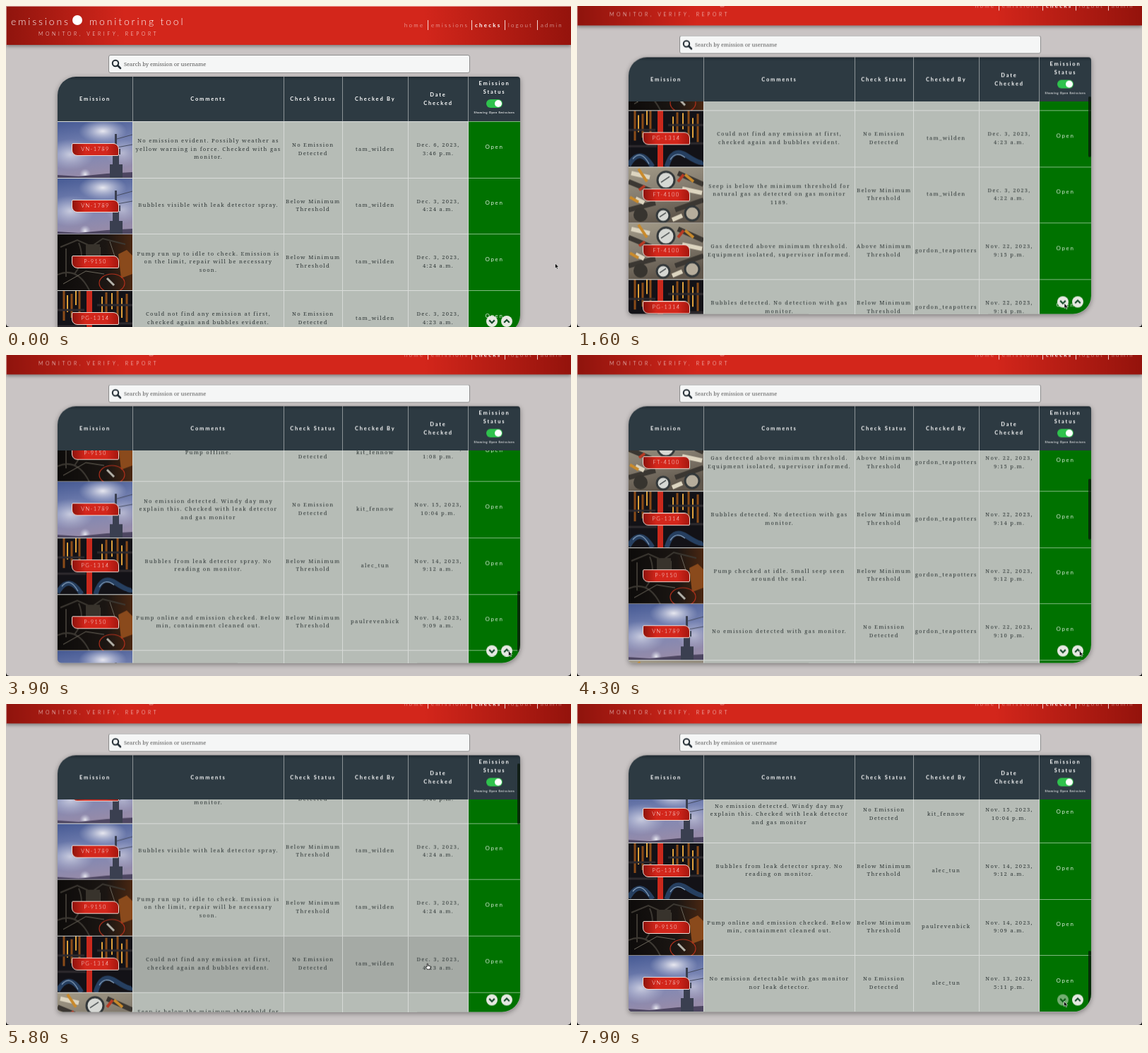
Recreate the animation shown at these times as an HTML page. Size 800x454 px, loop 8000 ms.

```html
<!DOCTYPE html>
<html lang="en">
<head>
<meta charset="utf-8">
<title>Emission checks</title>
<style>
  html, body { margin: 0; width: 100%; height: 100%; overflow: hidden; background: #111; }
  #stage { position: relative; width: 800px; height: 454px; overflow: hidden; background: #c9c4c4; border-radius: 0 0 5px 5px; }
  #page, #rows { position: absolute; left: 0; top: 0; width: 100%; will-change: transform; }
  #page *, #cursor { box-sizing: border-box; }

  header { position: absolute; width: 800px; height: 54.5px; color: #fff; font-family: Lato, sans-serif; font-weight: 300;
    background: linear-gradient(88deg, #8f140d, #d3261b 21%, #d3261b 74%, #94130c);
    box-shadow: 0 2px 5px rgba(0,0,0,.4), inset 1px 1px 0 rgba(255,255,255,.5); }
  header span { position: absolute; white-space: nowrap; line-height: 14px; }
  .title { top: 15px; font-size: 14px; letter-spacing: 2.85px; }
  .motto { left: 46px; top: 31.5px; font-size: 7px; letter-spacing: 3.6px; }
  .dot { position: absolute; left: 94px; top: 13px; width: 14px; height: 14px; border-radius: 50%; background: #fff; }
  .link { top: 20px; font-size: 8px; letter-spacing: 2.2px; opacity: .85; }
  .link.on { font-weight: 700; opacity: 1; }
  .bar { position: absolute; top: 20px; width: 1px; height: 14px; background: #f3d5d2; }

  .search { position: absolute; left: 145px; top: 69px; width: 512px; height: 26px; border: 1px solid #8b8b8b; border-radius: 3px;
    background: #f5f6f6; font: 300 7.5px/24px "Noto Serif", serif; color: #555; padding-left: 21px; }
  .search svg { position: absolute; left: 3px; top: 5px; }

  #table { position: absolute; left: 73px; top: 100px; width: 655px; height: 362.5px; overflow: hidden;
    border-radius: 26px 4px 26px 5px; }
  .shade { position: absolute; left: 73px; top: 100px; width: 655px; height: 362.5px;
    border-radius: 26px 4px 26px 5px; box-shadow: 0 2px 7px rgba(0,0,0,.4); }
  .row { display: grid; grid-template-columns: 107px 214px 82.5px 93.5px 85px 73px; }
  .row > div { position: relative; display: flex; align-items: center; justify-content: center; text-align: center;
    white-space: nowrap; border-right: 1px solid rgba(255,255,255,.45); }
  .row > div:last-child { border-right: 0; }
  .head { position: absolute; top: 0; z-index: 2; height: 63px; color: #fff; background: linear-gradient(#1f2a31, #2d3a42 5px);
    font: 700 7.5px/11.6px Lato, sans-serif; letter-spacing: 1.8px; }
  .head .last { flex-direction: column; justify-content: flex-start; padding-top: 4px; }
  .toggle { position: relative; width: 23px; height: 12px; margin-top: 5px; border-radius: 6px; background: #2fc24d; }
  .toggle::after { content: ""; position: absolute; right: 1px; top: 1px; width: 10px; height: 10px; border-radius: 50%; background: #fff; }
  .hint { font-size: 4px; line-height: 6px; letter-spacing: .6px; margin-top: 3.5px; }

  #body { position: absolute; top: 63px; width: 655px; height: 299.5px; overflow: hidden; background: #b6bcb6; }
  .check { height: 79.67px; color: #2d3535; background: #b6bcb6; font: 300 7.6px/11.5px "Noto Serif", serif; letter-spacing: 1.3px; }
  .check.hover { background: #a5aaa5; }
  .check > div { border-top: 1px solid rgba(255,255,255,.5); padding-bottom: 1.5px; }
  .check > .open { background: #007200; color: #d5ead5; padding-bottom: 9px; font: 400 8px/12px Lato, sans-serif; letter-spacing: 1.6px; }
  .pic { position: absolute; left: 0; top: 0; width: 106px; height: 79px; }
  .tag { position: absolute; left: 20px; top: 30px; width: 67px; height: 18px; border: 1px solid #f0d9d2; border-radius: 2px 8px 2px 8px;
    background: linear-gradient(90deg, #8f140d, #d3261b 28%, #d3261b 74%, #a5170f); color: #fff;
    font: 300 7.5px/16px Lato, sans-serif; letter-spacing: 1.4px; }
  .btn { position: absolute; z-index: 3; top: 337.5px; width: 16px; height: 16px; border-radius: 50%; background: #e6e9e2; }
  .btn svg { display: block; }
  #thumb { position: absolute; z-index: 4; left: 650.5px; top: 0; width: 4px; height: 86px; border-radius: 2px; background: rgba(8,22,10,.75); }
  #cursor { position: absolute; left: 0; top: 0; width: 12px; height: 14px; overflow: visible; }
</style>
</head>
<body>
<div id="stage">
  <div id="page">
    <div class="shade"></div>
    <header>
      <span class="title" style="left:7px">emissions</span><i class="dot"></i>
      <span class="title" style="left:118px">monitoring tool</span>
      <span class="motto">MONITOR, VERIFY, REPORT</span>
    </header>
    <div class="search">
      <svg width="15" height="15" fill="none" stroke="#222c33"><circle cx="6" cy="6" r="4.2" stroke-width="2"/><path d="M9 9L13 13" stroke-width="2.6" stroke-linecap="round"/></svg>Search by emission or username
    </div>
    <div id="table">
      <div class="row head">
        <div>Emission</div><div>Comments</div><div>Check Status</div><div>Checked By</div><div>Date<br>Checked</div>
        <div class="last">Emission<br>Status<i class="toggle"></i><span class="hint">Showing Open Emissions</span></div>
      </div>
      <div id="body"><div id="rows"></div></div>
      <div class="btn" id="down" style="left:607px"><svg width="16" height="16" fill="none" stroke="#14492a" stroke-width="2.2"><path d="M4.2 6.4L8 10.2L11.8 6.4"/></svg></div>
      <div class="btn" id="up" style="left:628px"><svg width="16" height="16" fill="none" stroke="#14492a" stroke-width="2.2"><path d="M4.2 9.8L8 6L11.8 9.8"/></svg></div>
      <div id="thumb"></div>
    </div>
  </div>
  <svg id="cursor">
    <path id="arrow" d="M0 0V7.2L1.7 5.7L2.9 8.3L4.1 7.8L3 5.3H5.2Z" fill="#000" stroke="#fff" stroke-width=".6"/>
    <path id="hand" d="M-1.4 -3.6Q-.8 -4.4 -.1 -3.6V-.9L2.9 -.3Q3.7 0 3.6 .9L3 4.2H-1.2L-3.4 1Q-3.2 -.2 -1.4 1Z" fill="#fff" stroke="#111" stroke-width=".8"/>
  </svg>
</div>

<svg width="0" height="0" style="position:absolute">
  <defs>
    <linearGradient id="sky" x2=".2" y2="1"><stop stop-color="#465a94"/><stop offset=".55" stop-color="#7d88b6"/><stop offset="1" stop-color="#968ba9"/></linearGradient>
    <radialGradient id="puff"><stop stop-color="#e8e8f0"/><stop offset="1" stop-color="#c4c8de" stop-opacity="0"/></radialGradient>
    <linearGradient id="rust"><stop stop-color="#0d0b0a"/><stop offset=".65" stop-color="#1b1613"/><stop offset="1" stop-color="#4a2712"/></linearGradient>
    <linearGradient id="brass" x2=".3" y2="1"><stop stop-color="#a39b88"/><stop offset=".5" stop-color="#857d70"/><stop offset="1" stop-color="#5f564b"/></linearGradient>
  </defs>
  <symbol id="VN" viewBox="0 0 106 79">
    <rect width="106" height="79" fill="url(#sky)"/>
    <g fill="url(#puff)"><ellipse cx="64" cy="13" rx="34" ry="17"/><ellipse cx="18" cy="46" rx="34" ry="22" opacity=".7"/><ellipse cx="92" cy="44" rx="24" ry="20" opacity=".5"/><circle cx="39" cy="74" r="8"/></g>
    <path d="M0 79V75L30 77L70 73L106 71V79Z" fill="#4d4661"/>
    <path d="M81 17H84V38H89V46H87V60H92V79H74V60H78V46H76V40H81Z" fill="#3a3f50"/>
    <path d="M84 24L106 18M84 36L106 32" stroke="#454b60"/>
  </symbol>
  <symbol id="P" viewBox="0 0 106 79">
    <rect width="106" height="79" fill="url(#rust)"/>
    <g fill="none" stroke="#3c3832" stroke-width="2">
      <path d="M4 18L28 8L48 17L64 6L96 14M0 57Q28 45 45 79M12 20V60M30 12Q40 36 24 56"/>
      <path d="M8 70L40 52L66 56M60 18V40M74 10L82 34" stroke="#6b665b" stroke-width="1"/>
    </g>
    <rect x="40" y="14" width="20" height="16" fill="#38332c"/>
    <path d="M86 28L98 22L106 30V56L90 62Z" fill="#8a4a1c"/>
    <path d="M70 62L80 72" stroke="#b5b3aa" stroke-width="3"/>
    <ellipse cx="77" cy="69" rx="18" ry="13" fill="none" stroke="#b5301c" stroke-width="1.2"/>
  </symbol>
  <symbol id="PG" viewBox="0 0 106 79">
    <rect width="106" height="79" fill="#131217"/>
    <path d="M9 0V42M20 4V38M31 0V46M69 2V40M85 0V48M98 4V44" stroke="#8a4b18" stroke-width="3"/>
    <path d="M14 6V30M26 0V20M63 8V36M77 3V26M91 10V38" stroke="#e0a23c" stroke-width="2"/>
    <path d="M0 27H38M56 20H106M0 50H40M54 46H106" stroke="#2e2a2e" stroke-width="3"/>
    <path d="M45 0V79" stroke="#c9281c" stroke-width="8"/>
    <path d="M0 77Q16 49 34 79M54 79Q62 50 82 63T106 73" fill="none" stroke="#263f60" stroke-width="7"/>
    <path d="M6 68Q18 54 29 75M59 69Q67 56 80 66" fill="none" stroke="#8ba4bf" stroke-width="1.2"/>
  </symbol>
  <symbol id="FT" viewBox="0 0 106 79">
    <rect width="106" height="79" fill="url(#brass)"/>
    <path d="M0 20L34 34M0 60L38 50M70 8L106 24M66 60L106 46" stroke="#3b3732" stroke-width="7"/>
    <path d="M4 8L30 14M76 30L104 36M10 44L22 50M62 74L76 68" stroke="#ddd5c0" stroke-width="6"/>
    <path d="M14 2L26 20M80 10L92 20M2 42L14 49" stroke="#c98a2c" stroke-width="4"/>
    <path d="M70 20L78 10M15 32L23 26" stroke="#b73a24" stroke-width="4"/>
    <g fill="#d6d8d4" stroke="#33383a" stroke-width="3"><circle cx="53" cy="18" r="12"/><circle cx="49" cy="68" r="9"/><circle cx="90" cy="65" r="10" fill="#b6ad9c"/></g>
    <path d="M46 21L58 13M44 70L53 64" stroke="#33393b" stroke-width="1.5"/>
    <circle cx="17" cy="67" r="10" fill="#37342f"/>
  </symbol>
</svg>

<script>
const $ = id => document.getElementById(id);
const LOOP = 8000, STEP = 100, ROW = 79.67, VIEW = 299.5, PAGE_SHIFT = 27.5;

const users = { a: "tam_wilden", b: "gordon_teapotters", c: "kit_fennow", d: "alec_tun", e: "paulrevenbick" };
const states = { N: "No Emission|Detected", B: "Below Minimum|Threshold", A: "Above Minimum|Threshold" };
const tags = { VN: "VN-1789", P: "P-9150", PG: "PG-1314", FT: "FT-4100" };

// picture, comment, state, user, date, time
const checks = [
  ["VN", "No emission evident. Possibly weather as|yellow warning in force. Checked with gas|monitor.", "N", "a", "Dec. 6", "3:46 p.m."],
  ["VN", "Bubbles visible with leak detector spray.", "B", "a", "Dec. 3", "4:24 a.m."],
  ["P", "Pump run up to idle to check. Emission is|on the limit, repair will be necessary|soon.", "B", "a", "Dec. 3", "4:24 a.m."],
  ["PG", "Could not find any emission at first,|checked again and bubbles evident.", "N", "a", "Dec. 3", "4:23 a.m."],
  ["FT", "Seep is below the minimum threshold for|natural gas as detected on gas monitor|1189.", "B", "a", "Dec. 3", "4:22 a.m."],
  ["FT", "Gas detected above minimum threshold.|Equipment isolated, supervisor informed.", "A", "b", "Nov. 22", "9:15 p.m."],
  ["PG", "Bubbles detected. No detection with gas|monitor.", "B", "b", "Nov. 22", "9:14 p.m."],
  ["P", "Pump checked at idle. Small seep seen|around the seal.", "B", "b", "Nov. 22", "9:12 p.m."],
  ["VN", "No emission detected with gas monitor.", "N", "b", "Nov. 22", "9:10 p.m."],
  ["FT", "Bubbles visible with leak detector spray.", "B", "c", "Nov. 19", "2:31 p.m."],
  ["PG", "No change since the last check.", "B", "c", "Nov. 19", "2:28 p.m."],
  ["VN", "Windy day, no emission evident on gas|monitor.", "N", "c", "Nov. 18", "1:15 p.m."],
  ["FT", "Seep still below the minimum threshold.", "B", "c", "Nov. 16", "1:10 p.m."],
  ["P", "Pump offline.", "N", "c", "Nov. 16", "1:08 p.m."],
  ["VN", "No emission detected. Windy day may|explain this. Checked with leak detector|and gas monitor", "N", "c", "Nov. 15", "10:04 p.m."],
  ["PG", "Bubbles from leak detector spray. No|reading on monitor.", "B", "d", "Nov. 14", "9:12 a.m."],
  ["P", "Pump online and emission checked. Below|min, containment cleaned out.", "B", "e", "Nov. 14", "9:09 a.m."],
  ["VN", "No emission detectable with gas monitor|nor leak detector.", "N", "d", "Nov. 13", "5:11 p.m."]
];
const MAX = checks.length * ROW - VIEW;

const lines = s => `<div>${s.replaceAll("|", "<br>")}</div>`;
$("rows").innerHTML = checks.map(([pic, note, state, user, day, time]) => `<div class="row check">
  <div><svg class="pic"><use href="#${pic}"/></svg><span class="tag">${tags[pic]}</span></div>
  ${lines(note)}${lines(states[state])}${lines(users[user])}${lines(`${day}, 2023,|${time}`)}
  <div class="open">Open</div></div>`).join("");
const rowEls = [...$("rows").children];

const header = document.querySelector("header");
[["home", 564], ["emissions", 602], ["checks", 664], ["logout", 711], ["admin", 757]].forEach(([name, x], i) => {
  const on = name === "checks" ? " on" : "";
  const bar = i ? `<i class="bar" style="left:${x - 5.5}px"></i>` : "";
  header.insertAdjacentHTML("beforeend", `${bar}<span class="link${on}" style="left:${x}px">${name}</span>`);
});

// Moves: start, end, from, to
const pageMoves = [[50, 650, 0, PAGE_SHIFT]];
const scrollMoves = [[1342, 2240, 0, MAX], [3772, 4672, MAX, 0], [5443, 6293, 0, 123], [7010, 7860, 123, MAX]];
const xMoves = [[650, 1250, 777.5, 690], [2800, 3450, 690, 711.5], [4550, 5000, 711.5, 597.5], [6350, 6750, 597.5, 689.5]];
const yMoves = [[650, 1250, 364, 420.5], [2800, 3450, 420.5, 418.5], [4550, 5000, 418.5, 371], [6350, 6750, 371, 420.5]];

const clamp = v => Math.min(1, Math.max(0, v));
const lastMove = (moves, t) => moves.findLast(m => t >= m[0]);
function valueAt(moves, t) {
  const m = lastMove(moves, t);
  if (!m) return moves[0][2];
  const p = clamp((t - m[0]) / (m[1] - m[0]));
  return m[2] + (m[3] - m[2]) * p * p * (3 - 2 * p);
}

function draw(t) {
  const shift = valueAt(pageMoves, t), scroll = valueAt(scrollMoves, t);
  const x = valueAt(xMoves, t), y = valueAt(yMoves, t);
  $("page").style.transform = `translateY(${-shift}px)`;
  $("rows").style.transform = `translateY(${-scroll}px)`;

  const move = lastMove(scrollMoves, t);
  $("thumb").style.transform = `translateY(${scroll * .2435}px)`;
  $("thumb").style.opacity = move ? 1 - clamp((t - move[1] - 200) / 300) : 0;
  $("down").style.opacity = scroll > MAX - 1 ? .5 : 1;
  $("up").style.opacity = move && scroll < 1 && t > 2000 ? .5 : 1;

  const onButtons = x > 677 && y > 407;
  const inBody = x > 73 && x < 728 && !onButtons;
  const hovered = inBody ? Math.floor((y - 163 + shift + scroll) / ROW) : -1;
  rowEls.forEach((el, i) => el.classList.toggle("hover", i === hovered));
  $("hand").style.display = inBody ? "" : "none";
  $("arrow").style.display = inBody ? "none" : "";
  $("cursor").style.transform = `translate(${x}px, ${y}px)`;
}

const begin = performance.now();
function tick() {
  const t = (performance.now() - begin) % LOOP;
  draw(Math.floor(t / STEP) * STEP);
  requestAnimationFrame(tick);
}
tick();
</script>
</body>
</html>
```
